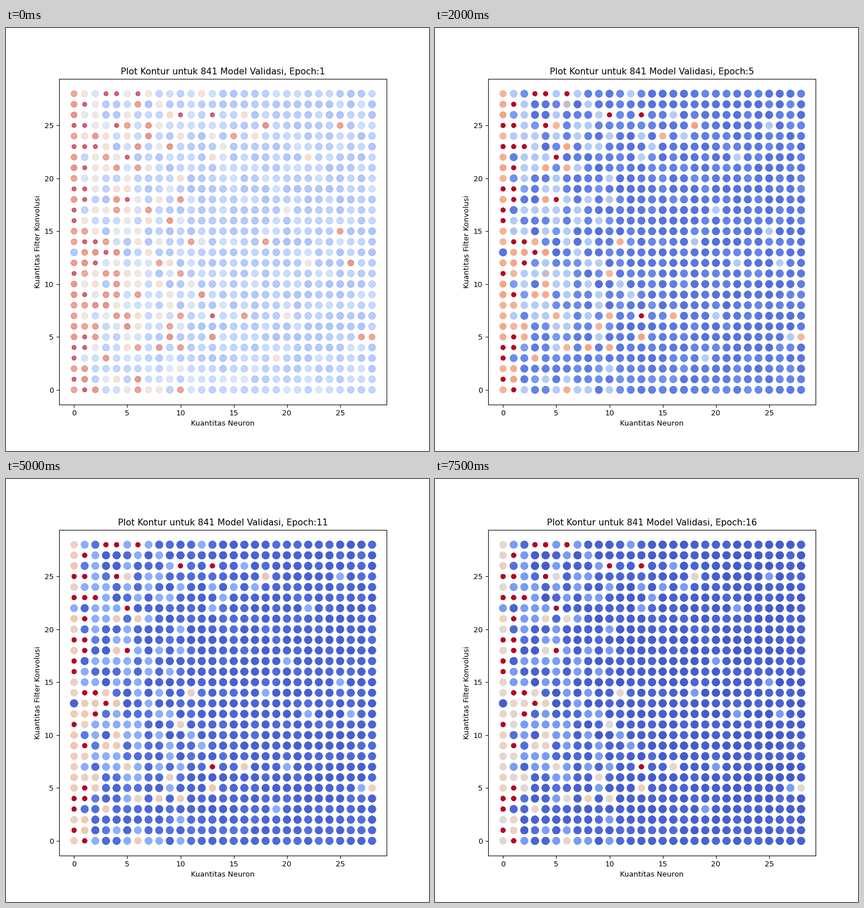
Write a matplotlib script that moves like this. It is 748 px wide and 748 px high and loops after 8000 ms.

```python
import numpy as np
import matplotlib.pyplot as plt
from matplotlib.animation import FuncAnimation

N, EPOCHS = 29, 16

rng = np.random.default_rng(841)
X, Y = np.meshgrid(np.arange(N), np.arange(N))
pick, spread, left, jitter, luck = rng.random((5, N, N))
shift = 0.06 * (jitter - 0.5)

# Models with few neurons are likelier to stall or to learn slowly.
p_dead = 0.33 * np.exp(-X / 3.6) + 0.001
p_slow = 0.42 * np.exp(-X / 3.5) + 0.008
p_medium = 0.3 * np.exp(-((X - 5) / 5) ** 2) + 0.03
dead = pick < p_dead
slow = ~dead & (pick < p_dead + p_slow)
medium = ~dead & ~slow & (pick < p_dead + p_slow + p_medium)

# Some medium models only improve after a few bad epochs.
last_bad = np.where(medium & (luck < 0.3), 1 + 7 * (luck / 0.3) ** 3, 0)

start = (0.2 + 0.16 * spread ** 2 + 0.38 * left ** 2 * np.exp(-X / 7)
         + 0.06 * np.exp(-Y / 2.5))


def loss(epoch):
    """Normalised loss of every model after an epoch."""
    log = np.log(epoch)
    bad = 0.87 - 0.12 * log + shift
    fair = 0.55 - 0.13 * log + 2 * shift / epoch
    v = np.where(medium, fair, start * epoch ** -0.64)
    v = np.where(slow | (epoch <= last_bad), bad, v)
    return np.where(dead, 1, v)


def size(v):
    return np.where(v == 1, 32, 95 - 36 * v)


fig, ax = plt.subplots(figsize=(8, 8), dpi=93.5)
ax.set(xlim=(-1.425, 29.375), ylim=(-1.385, 29.415),
       xlabel="Kuantitas Neuron", ylabel="Kuantitas Filter Konvolusi")
title = ax.set_title("")

# Each epoch is laid over the earlier ones.
layers = []
for epoch in range(1, EPOCHS + 1):
    v = loss(epoch).ravel()
    layers.append(ax.scatter(X.ravel(), Y.ravel(), s=size(v), c=v, alpha=0.6,
                             cmap="coolwarm", vmin=0, vmax=1))


def update(i):
    for k, layer in enumerate(layers):
        layer.set_visible(k <= i)
    title.set_text(f"Plot Kontur untuk 841 Model Validasi, Epoch:{i + 1}")
    return [*layers, title]


anim = FuncAnimation(fig, update, frames=EPOCHS, interval=500,
                     repeat=True, repeat_delay=0, blit=False)
plt.show()
```
